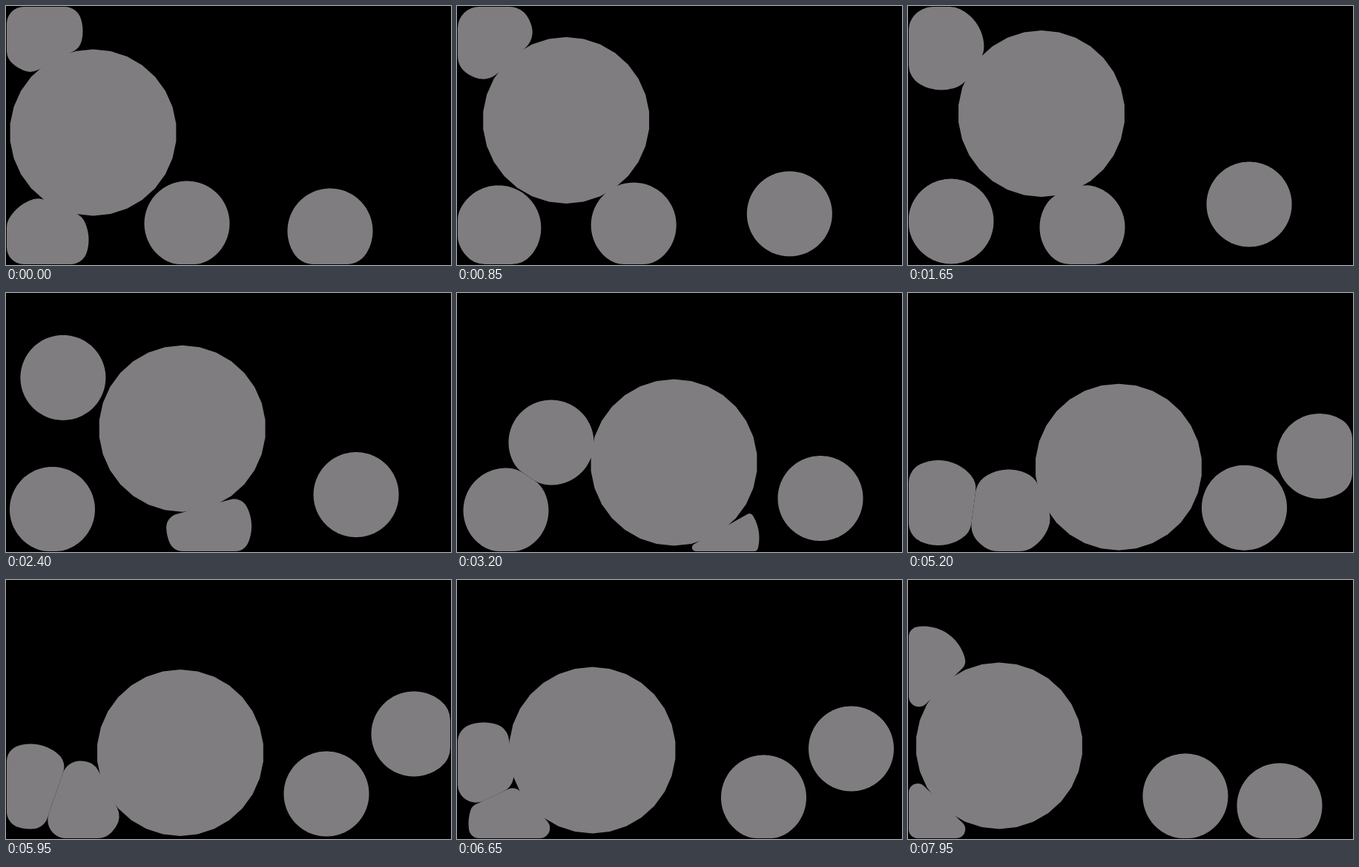
These frames come from a looping animation (600x350 px, 8000 ms). An HTML page with a canvas:

```html
<!DOCTYPE html>
<html lang="en">
<head>
<meta charset="utf-8">
<title>Soft bodies</title>
<style>
html, body { margin: 0; width: 100%; height: 100%; overflow: hidden; background: #000; }
canvas { display: block; }
</style>
</head>
<body>
<canvas id="stage" width="600" height="350"></canvas>
<script>
const ctx = document.getElementById('stage').getContext('2d');
const W = 600, H = 350, LOOP = 8000, STEP = 50, GREY = '#807d80';
const RADIUS = 57.5, BIG_RADIUS = 112.5, SINK = 3;

// Moments of contact, and where each body's centre is at those moments.
const beats = [0, 1650, 3200, 4350, 5950, 6650, 7950];
const bigPath = { x: [117.5, 180, 292.5, 315, 235, 182.5, 123], y: [171, 145.5, 229, 236, 233.5, 230, 224] };
const softPaths = [
  { x: [46, 45, 127, 161, 100, 73, 20], y: [34, 56, 202, 289, 302, 329, 332] },
  { x: [54, 58, 66, 55, 33, 36, 21], y: [316, 291, 294, 287, 279, 250, 120] },
  { x: [244, 235, 350, 468, 432, 413.5, 374], y: [294, 299, 331, 294, 289, 294, 292] },
  { x: [437, 460, 490, 557, 550, 531.5, 501], y: [304, 268, 277.5, 246, 208, 228, 305] }
];

// Each wall is an outward normal and its distance along that normal.
const walls = [
  { nx: -1, ny: 0, at: -1 }, { nx: 1, ny: 0, at: W - 1 },
  { nx: 0, ny: -1, at: -1 }, { nx: 0, ny: 1, at: H - 1 }
];

// Speed at a beat: zero at turning points, harmonic mean elsewhere.
function speed(values, k) {
  const rate = j => (values[j + 1] - values[j]) / (beats[j + 1] - beats[j]);
  if (k === 0) return rate(0);
  if (k === beats.length - 1) return rate(k - 1);
  const a = rate(k - 1), b = rate(k);
  return a * b <= 0 ? 0 : 2 * a * b / (a + b);
}

function sample(values, t) {
  let k = 0;
  while (k < beats.length - 2 && t >= beats[k + 1]) k++;
  const span = beats[k + 1] - beats[k];
  const u = Math.min(1, (t - beats[k]) / span), v = 1 - u;
  return values[k] * v * v * (1 + 2 * u)
    + values[k + 1] * u * u * (3 - 2 * u)
    + span * u * v * (speed(values, k) * v - speed(values, k + 1) * u);
}

const place = (path, t) => ({ x: sample(path.x, t), y: sample(path.y, t) });

function ring(centre, radius, sides) {
  return Array.from({ length: sides }, (_, i) => {
    const a = i / sides * 2 * Math.PI - Math.PI / 2;
    return { x: centre.x + radius * Math.cos(a), y: centre.y + radius * Math.sin(a) };
  });
}

// Plane where a body meets another: halfway for equals, the rim of the big one.
function contact(body, other, big) {
  const dx = other.x - body.x, dy = other.y - body.y, dist = Math.hypot(dx, dy);
  const nx = dx / dist, ny = dy / dist;
  const reach = other === big ? dist - BIG_RADIUS + SINK : dist / 2;
  return { nx, ny, at: body.x * nx + body.y * ny + reach };
}

const depth = (p, plane) => p.x * plane.nx + p.y * plane.ny - plane.at;

function clip(points, plane) {
  const kept = [];
  points.forEach((p, i) => {
    const q = points[(i + 1) % points.length];
    const a = depth(p, plane), b = depth(q, plane);
    if (a <= 0) kept.push(p);
    if (a * b < 0) {
      const u = a / (a - b);
      kept.push({ x: p.x + u * (q.x - p.x), y: p.y + u * (q.y - p.y) });
    }
  });
  return kept;
}

function trace(points) {
  ctx.beginPath();
  points.forEach(p => ctx.lineTo(p.x, p.y));
  ctx.closePath();
  ctx.fill();
}

// Cut the disc by its contacts, inset, then grow it back with a round stroke.
function drawSoft(body, others, big) {
  const planes = walls.concat(others.map(o => contact(body, o, big)));
  const squeeze = Math.max(0, ...planes.map(p => RADIUS + depth(body, p)));
  const corner = Math.max(5, 40 - 0.7 * squeeze);
  const core = planes.reduce(
    (points, p) => clip(points, { ...p, at: p.at - corner }),
    ring(body, RADIUS - corner, 60));
  if (!core.length) return;
  ctx.lineWidth = 2 * corner;
  trace(core);
  ctx.stroke();
}

function draw(t) {
  ctx.fillStyle = '#000';
  ctx.fillRect(0, 0, W, H);
  ctx.fillStyle = ctx.strokeStyle = GREY;
  ctx.lineJoin = 'round';
  const big = place(bigPath, t);
  const softs = softPaths.map(path => place(path, t));
  softs.forEach(s => drawSoft(s, [big, ...softs.filter(o => o !== s)], big));
  trace(ring(big, BIG_RADIUS, 30));
}

const start = performance.now();
function tick() {
  const t = (performance.now() - start) % LOOP;
  draw(Math.floor(t / STEP) * STEP);
  requestAnimationFrame(tick);
}
tick();
</script>
</body>
</html>
```
